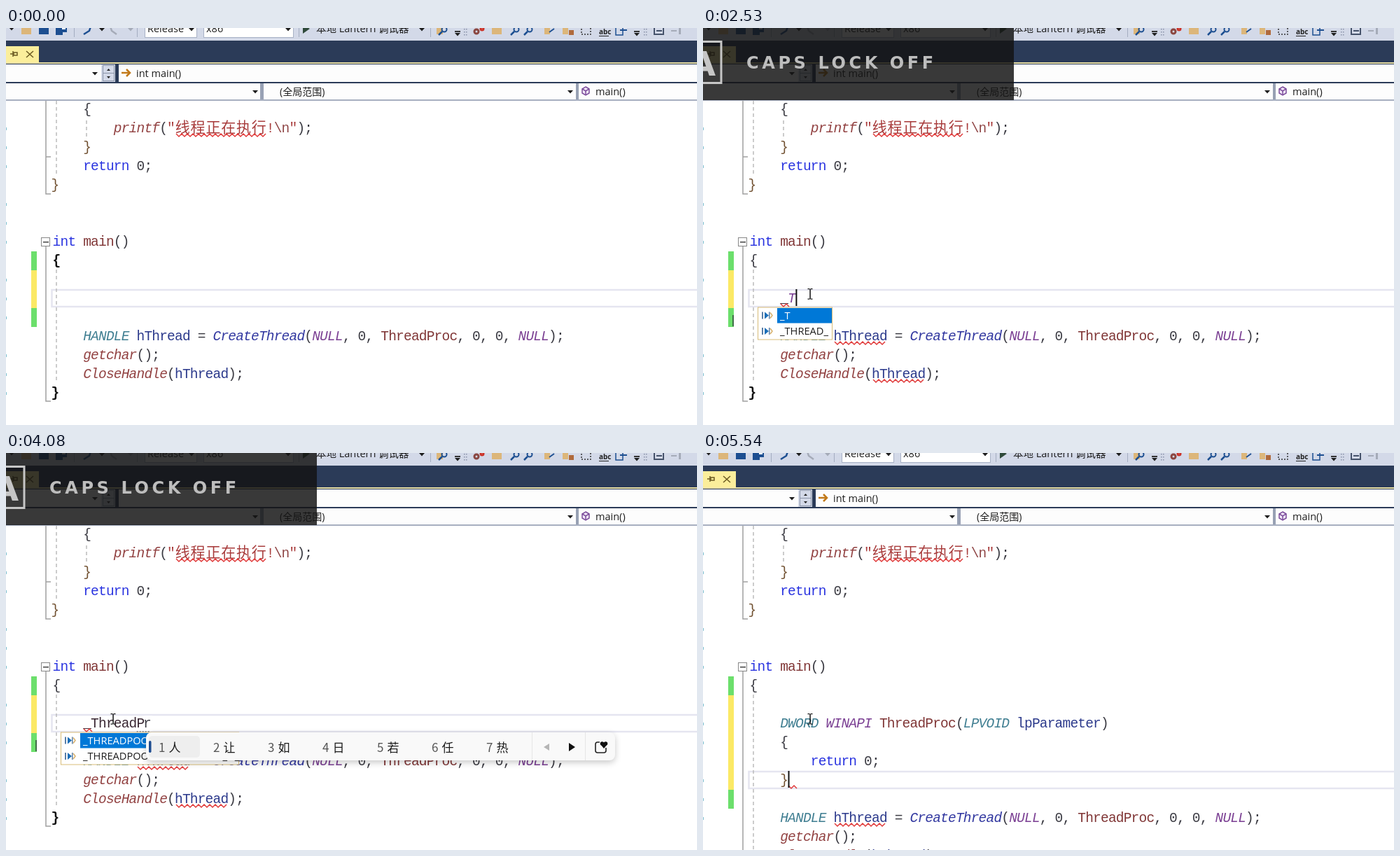
Animation of 987 by 567 pixels, one loop 5800 ms. Source, as an HTML page with a canvas:

```html
<!DOCTYPE html>
<html lang="zh">
<head>
<meta charset="utf-8">
<title>Typing a thread function</title>
<style>
html, body { margin: 0; width: 100%; height: 100%; overflow: hidden; background: #fff; }
canvas { display: block; }
</style>
</head>
<body>
<canvas id="stage" width="987" height="567"></canvas>
<script>
const g = document.getElementById('stage').getContext('2d');
const LOOP = 5800, COL = 10.9, LEFT = 67, ROW = 27;
const MONO = '"Liberation Mono", "Noto Sans CJK SC", "Noto Sans CJK", monospace';
const UI = '"Open Sans", "Noto Sans CJK SC", "Noto Sans CJK", sans-serif';
const CJK = '"Noto Sans CJK SC", "Noto Sans CJK", sans-serif';

// token styles: colour, then font style
const STYLE = {
  k: ['#2a34e0', ''], t: ['#417f92', 'italic'], f: ['#924242', 'italic'], c: ['#3238a0', 'italic'],
  n: ['#2c3a8c', ''], m: ['#803636', ''], u: ['#7c4194', 'italic'], p: ['#3a3a42', ''],
  s: ['#a83c3c', ''], e: ['#8f4646', ''], b: ['#705030', ''], x: ['#111', 'bold'], d: ['#3a2833', '']
};

// time, committed text, text being composed
const TYPING = [
  [0, '', ''], [1400, '_', ''], [2400, '_T', ''], [2740, '_T', 'h'], [2940, '_T', "h'r"],
  [3080, '_T', "h're"], [3150, '_T', "h'rea"], [3220, '_T', "h' read"], [3350, '_Thread', ''],
  [3880, '_ThreadP', ''], [4080, '_ThreadP', 'r'], [4150, '_ThreadP', 'ro'],
  [4280, '_ThreadP', 'roc'], [4410, '_ThreadProc', '']
];
const CARET_ON = [[600, 1130], [1400, 1930], [2400, 4080], [4150, 5070], [5400, LOOP]];
const CANDIDATES = {
  h: '和 会 好 还 很 后 或', "h'r": '和 好 会 还 很 后 或',
  "h're": '好热 火热 很热 换热 好惹 或热 河热', "h'rea": '好热啊 火热 好热 很热 换热 好惹 或热',
  "h' read": '和read 好热啊 火热 好热 很热 换热 好惹',
  r: '人 让 如 日 若 任 热', ro: '肉 若 弱 柔 容 软 揉', roc: '肉 若 弱 柔 容 软 揉'
};

const within = (t, a, b) => t >= a && t < b;
const colX = n => LEFT + n * COL;
const base = row => 122 + row * ROW;

function rect(x, y, w, h, color) {
  g.fillStyle = color;
  g.fillRect(x, y, w, h);
}
function text(s, x, y, color, font) {
  g.font = font;
  g.fillStyle = color;
  g.fillText(s, x, y);
}
function path(points, stroke, width = 1, fill) {
  g.beginPath();
  points.forEach(([x, y]) => g.lineTo(x, y));
  if (fill) { g.closePath(); g.fillStyle = fill; g.fill(); }
  if (stroke) { g.strokeStyle = stroke; g.lineWidth = width; g.stroke(); }
}
function ring(x, y, r, color, width = 2) {
  g.beginPath();
  g.arc(x, y, r, 0, 7);
  g.strokeStyle = color;
  g.lineWidth = width;
  g.stroke();
}
function round(x, y, w, h, r, color) {
  g.beginPath();
  g.roundRect(x, y, w, h, r);
  g.fillStyle = color;
  g.fill();
}
const down = (x, y, color = '#1e1e1e') => path([[x - 4, y - 2], [x + 4, y - 2], [x, y + 2.5]], null, 1, color);

function dashed(x, y1, y2) {
  g.setLineDash([5, 4]);
  path([[x, y1], [x, y2]], '#bcbcbc', 1.5);
  g.setLineDash([]);
}
function squiggle(x1, x2, row) {
  const y = base(row) + 4, pts = [];
  for (let x = x1, i = 0; x <= x2; x += 4, i++) pts.push([x, y + (i % 2 ? 2 : -2)]);
  path(pts, '#e03a3a', 1.5);
}
// draws "style+text" runs on the character grid
function code(row, x, runs) {
  g.textAlign = 'center';
  for (const run of runs.split('|')) {
    const [color, style] = STYLE[run[0]];
    for (const ch of run.slice(1)) {
      const w = ch > '\u00ff' ? 2 * COL : COL;
      text(ch, x + w / 2, base(row), color, `${style} ${w > COL ? 21 : 19.5}px ${MONO}`);
      x += w;
    }
  }
  g.textAlign = 'left';
}

function toolbar() {
  rect(0, 0, 987, 18, '#d3d9e8');
  const tan = '#dcb67a', blue = '#1d4f91', grey = '#a5abb8';
  down(8, 1);
  rect(22, 0, 14, 9, tan);
  rect(47, 0, 14, 9, blue);
  rect(71, 0, 10, 10, blue);
  rect(78, 0, 9, 6, blue);
  rect(80, 0, 5, 2, '#fff');
  path([[111, 9], [119, 4], [121, -2]], blue, 2.5);
  down(137, 2);
  path([[158, 9], [151, 4], [149, -2]], grey, 2.5);
  down(178, 2, grey);
  [[198, 75], [282, 129]].forEach(([x, w]) => {
    rect(x, -2, w, 16, '#a9b2c6');
    rect(x + 1, -2, w - 2, 15, '#fff');
    down(x + w - 8, 2);
  });
  text('Release', 202, 6, '#1e1e1e', '14.5px ' + UI);
  text('x86', 286, 6, '#1e1e1e', '14.5px ' + UI);
  path([[424, -4], [434, 1], [424, 8]], null, 1, '#2f4a3a');
  text('本地 Lantern 调试器', 443, 6, '#1e1e1e', '14.5px ' + UI);
  down(594, 2);
  [97, 187, 418, 606].forEach(x => rect(x, 0, 1, 13, '#a4adc0'));
  [[615, 9], [694, 14], [769, 8], [795, 8]].forEach(([x, w]) => rect(x, 0, w, 9, tan));
  [626, 729, 748].forEach(x => {
    ring(x, 2, 3.5, blue);
    path([[x - 3, 5], [x - 8, 10]], blue, 2.5);
  });
  [645, 901].forEach(x => {
    rect(x - 4, 4, 8, 2, '#333');
    down(x, 9);
  });
  [654, 911].forEach(x => {
    for (let i = 0; i < 6; i++) rect(x + i % 2 * 3, (i >> 1) * 4 + 1, 1.5, 1.5, '#8791a8');
  });
  ring(672, 5, 3, '#8a4640', 3);
  ring(680, 1, 2, '#cc3328', 3);
  rect(804, 3, 7, 7, '#b06a3c');
  path([[776, 6], [783, 1]], blue, 2);
  g.setLineDash([2, 2]);
  g.strokeStyle = '#333';
  g.lineWidth = 1.5;
  g.strokeRect(822, -3, 13, 12);
  g.setLineDash([]);
  text('abc', 847, 9, '#222', 'bold 10px ' + UI);
  rect(847, 11, 14, 1, '#222');
  g.strokeStyle = blue;
  g.strokeRect(871, -3, 10, 13);
  path([[877, 3], [887, 3]], blue, 2);
  g.strokeStyle = '#46536b';
  g.strokeRect(926, -2, 13, 11);
  rect(929, 3, 8, 2, '#46536b');
  rect(950, 3, 8, 2, grey);
  rect(961, 0, 3, 9, grey);
}

function navigation(showMember) {
  const navy = '#2b3b58';
  rect(0, 18, 987, 86, navy);
  rect(0, 26, 47, 25, '#fbee9b');
  rect(0, 49, 987, 2, '#e9dfa4');
  path([[6, 37], [10, 37]], '#6b5a22', 1.5);
  path([[10, 33], [10, 41]], '#6b5a22', 1.5);
  g.strokeStyle = '#6b5a22';
  g.strokeRect(11, 35, 5, 4);
  path([[29, 33], [39, 42]], '#6b5a22', 1.5);
  path([[39, 33], [29, 42]], '#6b5a22', 1.5);

  rect(0, 52, 987, 25, '#fdfdfd');
  rect(0, 79, 987, 23, '#fdfdfd');
  rect(0, 102, 987, 2, '#a7afc0');
  down(127, 65);
  rect(136, 52, 20, 25, '#d3d9e8');
  g.strokeStyle = '#8c96aa';
  g.lineWidth = 1;
  g.strokeRect(138.5, 53.5, 16, 11);
  g.strokeRect(138.5, 64.5, 16, 11);
  path([[144, 61], [149, 61], [146.5, 58]], null, 1, '#222');
  path([[144, 69], [149, 69], [146.5, 72]], null, 1, '#222');
  rect(156, 52, 5, 25, navy);
  if (showMember) {
    path([[165, 64], [177, 64]], '#c27a1a', 2.5);
    path([[172, 59], [177, 64], [172, 69]], '#c27a1a', 2.5);
    text('int main()', 186, 70, '#1e1e1e', '14.5px ' + UI);
  }
  down(356, 91);
  down(806, 91);
  rect(363, 79, 5, 23, '#98a1b4');
  rect(814, 79, 4, 23, '#98a1b4');
  text('(全局范围)', 391, 96, '#1e1e1e', '14px ' + UI);
  const hex = [[828, 84], [833, 87], [833, 93], [828, 96], [823, 93], [823, 87]];
  path(hex, '#7c4d9c', 1.5, '#f0e6f6');
  path([[823, 87], [828, 90], [833, 87]], '#7c4d9c', 1.5);
  path([[828, 90], [828, 96]], '#7c4d9c', 1.5);
  text('main()', 842, 96, '#1e1e1e', '14.5px ' + UI);
}

function editor(t, done) {
  rect(0, 104, 987, 463, '#fff');
  for (let r = 1; r < 17; r++) if (r % 4) rect(0, base(r) - 7, 1, 4, '#7fc0d0');

  const extra = done ? 3 * ROW : 0;
  rect(36, 319, 8, 27, '#6cdf6c');
  rect(36, 346, 8, 54 + extra, '#fbe965');
  rect(36, 400 + extra, 8, 27, '#6cdf6c');
  if (within(t, 400, 5400)) rect(42, 410, 2, 16, '#3e6e46');

  g.strokeStyle = '#e5e5f0';
  g.lineWidth = 2.5;
  g.strokeRect(65.5, 374 + extra, 940, 24);

  dashed(72, 104, 210);
  dashed(115, 132, 158);
  dashed(72, 345, done ? 567 : 506);
  const grey = '#a0a0a0';
  path([[57, 104], [57, 237], [64, 237]], grey, 1.5);
  path([[57, 184], [64, 184]], grey, 1.5);
  path([[57, 312], [57, 533 + extra], [64, 533 + extra]], grey, 1.5);
  g.lineWidth = 1;
  g.strokeStyle = '#888';
  g.strokeRect(50.5, 299.5, 12, 12);
  rect(53, 305, 8, 1.5, '#444');

  const x4 = colX(4), x8 = colX(8);
  code(0, x4, 'p{');
  code(1, x8, 'fprintf|p(|s"线程正在执行!|e\\n|s"|p);');
  squiggle(243, 372, 1);
  code(2, x4, 'b}');
  code(3, x4, 'kreturn|p 0;');
  code(4, LEFT - 2, 'b}');
  code(7, LEFT, 'kint|m main|p()');
  code(8, LEFT, t < 70 ? 'x{' : 'p{');
  const r = done ? 15 : 12;
  code(r, x4, 'tHANDLE|n hThread|p = |cCreateThread|p(|uNULL|p, 0, |mThreadProc|p, 0, 0, |uNULL|p);');
  code(r + 1, x4, 'fgetchar|p();');
  code(r + 2, x4, 'fCloseHandle|p(|nhThread|p);');
  code(r + 3, LEFT - 2, 'x}');
  if (t >= 2530) {
    squiggle(188, 263, r);
    squiggle(243, 317, r + 2);
  }
  if (done) {
    code(10, x4, 'tDWORD|u WINAPI|m ThreadProc|p(|tLPVOID|n lpParameter|p)');
    code(11, x4, 'p{');
    code(12, x8, 'kreturn|p 0;');
    code(13, x4, 'b}');
    if (t >= 5470) squiggle(122, 136, 13);
  }
}

function macroIcon(y) {
  rect(84, y - 5, 2, 10, '#5a7fa8');
  path([[88, y - 5], [94, y], [88, y + 5]], null, 1, '#1c6fb8');
  rect(94, y - 5, 1.5, 10, '#5a7fa8');
  path([[96, y - 4], [99, y], [96, y + 4]], '#d8b06a', 1.5);
}
function suggestions(t) {
  const single = t >= 4540;
  const items = single ? ['DWORD WINAPI ThreadProc(...']
    : t < 3350 ? ['_T', '_THREAD_']
    : t < 3880 ? ['_THREAD_', '_T']
    : ['_THREADPOOLAPISET_', '_THREADPOOLLEGACYAPISET_H_'];
  const w = t < 3880 ? 107 : 255, h = single ? 24 : 47;
  rect(78, 398.5, w, h, '#d9bd78');
  rect(79, 399.5, w - 2, h - 2, '#fff');
  rect(106, 400, w - 29, 21.5, '#0078d7');
  items.forEach((s, i) => {
    text(s, 110, 415.5 + i * 22.5, i ? '#1e1e1e' : '#fff', '14.6px ' + UI);
    if (!single) macroIcon(410.5 + i * 22.5);
  });
  if (single) {
    path([[88, 404], [88, 412]], '#1f66a8', 2);
    path([[84, 409], [88, 413], [92, 409]], '#1f66a8', 2);
    g.setLineDash([2, 2]);
    path([[94, 406], [100, 406], [100, 417], [86, 417]], '#555', 1.2);
    g.setLineDash([]);
  }
}

function candidateBar(comp) {
  const first = comp[0] === 'h', left = first ? 134 : 200, top = first ? 402 : 399;
  const font = '17px ' + CJK;
  g.font = font;
  const list = CANDIDATES[comp].split(' ').map(s => [s, 14.5 + g.measureText(s).width]);
  const pitch = w => Math.max(78, w + 26);
  const sep = left + 5 + list.reduce((sum, [, w]) => sum + pitch(w), 0);
  g.shadowColor = 'rgba(0,0,0,.22)';
  g.shadowBlur = 10;
  g.shadowOffsetY = 3;
  round(left, top, sep + 119 - left, 40, 8, '#f9f9f9');
  g.shadowColor = 'transparent';
  round(left + 4, top + 5, pitch(list[0][1]) - 5, 31, 5, '#eeeeee');
  round(left + 4, top + 12, 3.5, 17, 2, '#1d4b8f');
  let x = left + 18;
  list.forEach(([s, w], i) => {
    text(i + 1, x, top + 27.5, '#555', font);
    text(s, x + 14.5, top + 27.5, '#1c1c1c', font);
    x += pitch(w);
  });
  rect(sep, top, 1, 40, '#e6e6e6');
  rect(sep + 76, top, 1, 40, '#e6e6e6');
  const y = top + 21;
  path([[sep + 25, y - 5], [sep + 25, y + 5], [sep + 17, y]], null, 1, '#b5b5b5');
  path([[sep + 53, y - 6], [sep + 53, y + 6], [sep + 62, y]], null, 1, '#111');
  g.beginPath();
  g.roundRect(sep + 91, y - 7, 15, 15, 3);
  g.strokeStyle = '#222';
  g.lineWidth = 1.6;
  g.stroke();
  const hx = sep + 103;
  rect(hx - 6, y - 10, 13, 11, '#f9f9f9');
  g.beginPath();
  g.arc(hx - 2.5, y - 5, 2.8, 0, 7);
  g.arc(hx + 2.5, y - 5, 2.8, 0, 7);
  g.fillStyle = '#111';
  g.fill();
  path([[hx - 5, y - 4], [hx + 5, y - 4], [hx, y + 2]], null, 1, '#111');
}

function capsNotice(state) {
  rect(0, 0, 444, 103, 'rgba(20,20,20,.84)');
  g.strokeStyle = '#c6c6c6';
  g.lineWidth = 3;
  g.strokeRect(-36, 19.5, 62, 59);
  text('A', -19, 68, '#c6c6c6', 'bold 48px "DejaVu Sans", sans-serif');
  g.letterSpacing = '4.6px';
  text('CAPS LOCK ' + state, 62, 58, '#bdbdbd', 'bold 24px "DejaVu Sans", sans-serif');
  g.letterSpacing = '0px';
}

function mousePlace(t) {
  if (t >= 670) return [153, 380];
  const step = Math.min(8, Math.floor((t - 70) / 66.25));
  const mix = (a, b, k) => a.map((v, i) => v + (b[i] - v) * k);
  return step < 4 ? mix([780, 510], [43, 418], step / 4) : mix([43, 418], [148, 374], step / 4 - 1);
}
function mouse(t) {
  const [x, y] = mousePlace(t);
  if (x < 62 || within(t, 3080, 3350)) {
    const shape = [[0, 0], [0, 15], [3.5, 12], [6, 17.5], [8.5, 16.5], [6, 11], [10.5, 11]];
    path(shape.map(([a, b]) => [x - 2 + a, y - 1 + b]), '#222', 1, '#fff');
    return;
  }
  rect(x - 0.7, y - 7, 1.5, 14, '#111');
  for (const dy of [-8, 6.5]) {
    rect(x - 3.5, y + dy, 3, 1.2, '#111');
    rect(x + 0.5, y + dy, 3, 1.2, '#111');
  }
}

function draw(t) {
  const done = t >= 5400;
  toolbar();
  navigation(!within(t, 3680, 5540));
  editor(t, done);

  const [, typed, comp] = TYPING.findLast(s => t >= s[0]);
  let caretX = colX(4 + (done ? 1 : typed.length));
  if (!done) {
    if (typed === '_T') code(10, colX(4), 'd_|uT');
    else code(10, colX(4), 'd' + typed);
    if (t >= 2530) squiggle(111, 123, 10);
    if (comp) {
      rect(caretX, 375, comp.length * COL, 22, '#fff');
      code(10, caretX - 1.5, 'p' + comp);
      caretX += comp.length * COL - 2;
      g.setLineDash([2, 2]);
      path([[caretX - 20, 398], [caretX, 398]], '#333', 1);
      g.setLineDash([]);
    }
    if (t >= 1470) suggestions(t);
    if (comp) candidateBar(comp);
  }
  if (CARET_ON.some(([a, b]) => within(t, a, b))) rect(caretX, done ? 454 : 373, 2, 24, '#111');
  if (within(t, 2130, 5470)) capsNotice(t < 2530 || within(t, 3680, 4010) ? 'ON' : 'OFF');
  if (t >= 70) mouse(t);
}

const start = performance.now();
function frame() {
  draw((performance.now() - start) % LOOP);
  requestAnimationFrame(frame);
}
frame();
</script>
</body>
</html>
```
